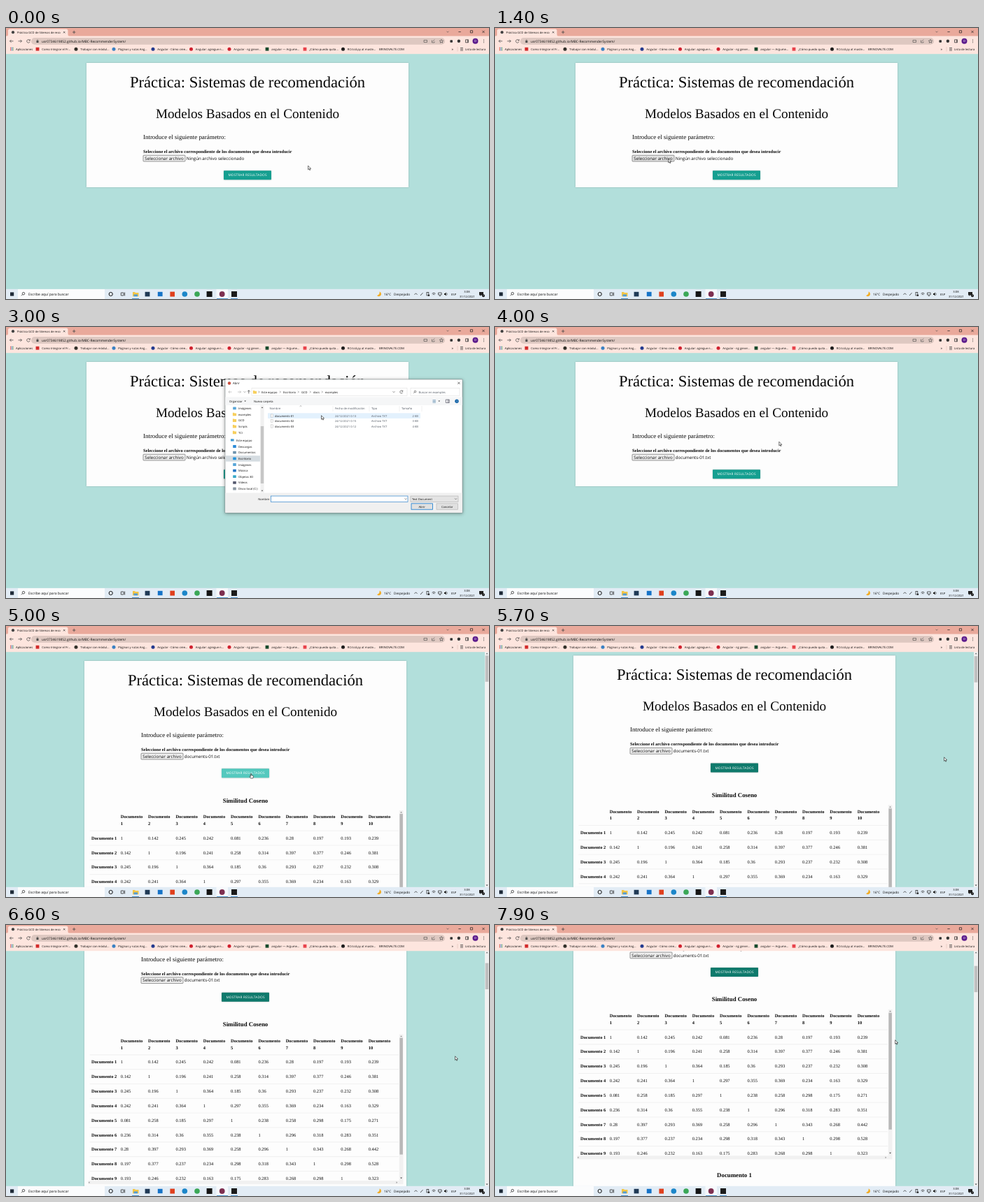
Write an HTML page that moves like this. It is 690 px wide and 388 px high and loops after 8 s.

```html
<!DOCTYPE html>
<html lang="es">
<head>
<meta charset="utf-8">
<title>Sistemas de recomendación</title>
<style>
html, body { margin: 0; width: 100%; height: 100%; overflow: hidden; background: #b2dfdb; }
svg { display: block; width: 100vw; height: 100vh; }
text { font-family: "Open Sans", "Noto Sans", sans-serif; fill: #0c0c0c; white-space: pre; text-rendering: geometricPrecision; }
text.serif { font-family: "Liberation Serif", "Noto Serif", serif; fill: #080808; }
.card { filter: drop-shadow(0 .7px .5px rgba(0,0,0,.16)) drop-shadow(0 .3px .8px rgba(0,0,0,.2)); }
.window { filter: drop-shadow(0 1.5px 2.5px rgba(0,0,0,.4)); }
</style>
</head>
<body>
<svg id="stage" viewBox="0 0 690 388" preserveAspectRatio="none"></svg>
<script>
const LOOP = 8000;

const rect = (x, y, w, h, fill, extra = '') =>
  `<rect x="${x}" y="${y}" width="${w}" height="${h}" fill="${fill}" ${extra}/>`;
const dot = (x, y, r, fill, extra = '') =>
  `<circle cx="${x}" cy="${y}" r="${r}" fill="${fill}" ${extra}/>`;
const line = (d, color = '#444', width = .75) =>
  `<path d="${d}" fill="none" stroke="${color}" stroke-width="${width}"/>`;
const shape = (d, fill) => `<path d="${d}" fill="${fill}"/>`;
const label = (x, y, size, text, extra = '') =>
  `<text x="${x}" y="${y}" font-size="${size}" ${extra}>${text}</text>`;
const serif = (x, y, size, text, extra = '') => label(x, y, size, text, `class="serif" ${extra}`);
const MID = 'text-anchor="middle"', END = 'text-anchor="end"', BOLD = 'font-weight="700"';
const border = (color, width = .6) => `stroke="${color}" stroke-width="${width}"`;

const down = (x, y, color = '#444') => line(`M${x - 1.5} ${y - .8}l1.5 1.5 1.5-1.5`, color, .6);
const next = (x, y) => line(`M${x - .6} ${y - 1.3}l1.3 1.3-1.3 1.3`, '#444', .5);
const lens = (x, y, r, color) =>
  dot(x, y, r, 'none', border(color, .7)) + line(`M${x - r * .7} ${y + r * .7}l${-r} ${r}`, color);
const folder = (x, y) => shape(`M${x - 2.6} ${y - 2.2}h2l.7.7h2.5v3.8h-5.2z`, '#f7cf5c');

// Upper triangle of the similarity matrix, in thousandths
const upper = [
  [142, 245, 242, 81, 236, 280, 197, 193, 239],
  [196, 241, 258, 314, 397, 377, 246, 381],
  [364, 185, 360, 293, 237, 232, 308],
  [297, 355, 369, 234, 163, 329],
  [238, 258, 298, 175, 271],
  [296, 318, 283, 351],
  [343, 268, 442],
  [298, 528],
  [323]
];
function similarity(i, j) {
  if (i === j) return 1;
  const a = Math.min(i, j), b = Math.max(i, j);
  return upper[a][b - a - 1] / 1000;
}

function table() {
  let out = serif(345, 252.5, 8.84, 'Similitud Coseno', `${MID} ${BOLD}`);
  const colX = j => 166.8 + 39.32 * j, rowY = i => 293.2 + 20.83 * i;
  for (let j = 0; j < 10; j++)
    out += serif(colX(j), 275.4, 6.45, 'Documento', BOLD) + serif(colX(j), 285.2, 6.45, j + 1, BOLD);
  for (let i = 0; i < 9; i++) {
    out += line(`M122.5 ${rowY(i)}H564`, '#e2e2e2', .5);
    out += serif(125, rowY(i) + 12.6, 6.45, 'Documento ' + (i + 1), BOLD);
    for (let j = 0; j < 10; j++) out += serif(colX(j), rowY(i) + 12.6, 6.45, similarity(i, j));
  }
  return out
    + rect(120, 473.6, 450.5, 5, '#f1f1f1') + rect(564.8, 264, 5.7, 209.6, '#f1f1f1')
    + rect(565.4, 269, 4.5, 167, '#b8b8b8')
    + shape('M566.2 267.4l1.4-1.6 1.4 1.6z', '#888') + shape('M566.2 469l1.4 1.6 1.4-1.6z', '#444')
    + shape('M122.4 474.7l-1.5 1.4 1.5 1.4z', '#888') + shape('M560.6 474.7l1.5 1.4-1.5 1.4z', '#888')
    + serif(345, 504, 8.84, 'Documento 1', `${MID} ${BOLD}`);
}

function page() {
  return rect(115, 50, 460, 178, '#fdfdfd', 'id="card" class="card"')
    + serif(345, 84.7, 22.64, 'Práctica: Sistemas de recomendación', MID)
    + serif(345, 129, 19.19, 'Modelos Basados en el Contenido', MID)
    + serif(196, 159, 8.92, 'Introduce el siguiente parámetro:')
    + serif(196, 179, 6.45, 'Seleccione el archivo correspondiente de los documentos que desea introducir', BOLD)
    + rect(196, 182.2, 60, 8.8, '#efefef', `id="pick" rx=".8" ${border('#5e5e5e', .65)}`)
    + label(198.3, 188.9, 6.18, 'Seleccionar archivo')
    + label(257.8, 188.9, 6.18, '', 'id="file"')
    + rect(311, 204.2, 68, 13, '#159f90', 'id="send" rx=".7" class="card"')
    + dot(353, 212, 0, '#fff', 'id="ripple" clip-path="url(#sendClip)"')
    + label(345.1, 212.4, 4.74, 'MOSTRAR RESULTADOS', `${MID} letter-spacing=".18" font-weight="500" style="fill:#fff"`)
    + `<g id="table">${table()}</g>`;
}

function browser() {
  let out = rect(0, 0, 690, 12, '#e9a99b')
    + shape('M1 12Q3 12 3 9V4Q3 1.5 5.5 1.5H86Q88.5 1.5 88.5 4V9Q88.5 12 91 12z', '#fde5de')
    + rect(0, 11.5, 690, 25.7, '#fde5de') + rect(36, 14, 591, 9.8, '#dec8c1', 'rx="4.9"')
    + dot(10, 6.2, 2.1, '#444')
    + label(16, 7.7, 4.1, 'Práctica GCD de Sitemas de reco')
    + line('M82 5l2.4 2.4m0-2.4l-2.4 2.4') + line('M95 6h4.4m-2.2-2.2v4.4') + down(631, 5.5)
    + line('M646.4 5.5h3.4M663.4 3.7h3.2v3.2h-3.2zM680.4 3.8l3.3 3.3m0-3.3l-3.3 3.3', '#222', .7)
    + line('M10.5 18.8h-5m2-2l-2 2 2 2M17.5 18.8h5m-2-2l2 2-2 2')
    + line('M34 17.7a2.3 2.3 0 1 0 .2 1.9M34.3 16.2v1.8h-1.8')
    + rect(43.5, 18.3, 3, 2.7, '#444') + line('M44.2 18.4v-1q.8-1.2 1.6 0v1', '#444', .6)
    + label(51, 20.7, 4.8, 'usr0734619852.github.io/MBC-RecommenderSystem/')
    + line('M597 17.4h4.5v3H597zM608.5 17.5v3.4h3.5v-1.5M609.7 19l2.6-2.4M622 16.3l.8 1.7 1.9.2-1.4 1.2.4 1.9-1.7-1-1.7 1 .4-1.9-1.4-1.2 1.9-.2z', '#444', .6)
    + rect(634.4, 17.2, 3.6, 3.6, '#333', 'rx=".8"') + dot(646.9, 18.8, 2.2, '#333')
    + line('M656.5 16.8h4v4h-4zM659.3 16.8v4', '#333')
    + dot(670.5, 18.8, 4, '#5b1a8b') + label(670.5, 20.4, 4.4, 'D', `${MID} style="fill:#fff"`)
    + [16.8, 18.8, 20.8].map(y => dot(682.6, y, .55, '#333')).join('');
  for (let i = 0; i < 9; i++)
    out += rect(6 + i % 3 * 1.7, 27.7 + Math.floor(i / 3) * 1.7, 1.2, 1.2, ['#d9534a', '#4a86d9', '#4aa564'][i % 3]);
  const marks = [
    [45, 's', '#d22b2b', 'Como Integrar el Fr…'], [100, 'c', '#33322b', 'Trabajar con módul…'],
    [154, 'c', '#3b82c4', 'Páginas y rutas Ang…'], [210, 'c', '#243b8f', 'Angular - Cómo cree…'],
    [264.5, 'c', '#d0212f', 'Angular: agregue n…'], [319, 'c', '#d0212f', 'Angular - ng gener…'],
    [373, 's', '#174a2c', 'angular — Argume…'], [427, 's', '#e8434b', '¿Cómo puedo quita…'],
    [481.5, 'c', '#1d1d1d', 'RC/ccd.py at maste…']
  ];
  out += label(14, 31.7, 4.2, 'Aplicaciones');
  for (const [x, kind, color, text] of marks)
    out += (kind === 's' ? rect(x - 2.4, 27.8, 4.8, 4.8, color) : dot(x, 30.2, 2.5, color))
      + label(x + 6.3, 31.7, 4.2, text);
  return out + label(533, 31.7, 4.3, 'BRINOVALTE.COM') + label(636.5, 31.9, 5, '»')
    + line('M645 27v6.5', '#d7b5ab', .5) + line('M649 28.5h4m-4 1.8h4m-4 1.8h4', '#333', .7)
    + label(656, 31.7, 4.15, 'Lista de lectura');
}

function pageBar() {
  return rect(684, 37, 6, 337, '#f1f1f1') + shape('M685.6 40.3l1.5-1.7 1.5 1.7z', '#666')
    + shape('M685.6 370.5l1.5 1.7 1.5-1.7z', '#444')
    + rect(684.7, 42.3, 4.6, 37.5, '#bfbfbf', 'id="thumb"');
}

function taskbar() {
  return rect(0, 373.8, 690, 14.2, '#e2ecf5') + rect(17, 374, 124, 14, '#fbfcfd')
    + rect(6, 378.4, 5.2, 5.2, '#1e2a38') + lens(25, 380.2, 1.8, '#222')
    + label(32, 382.7, 5.05, 'Escribe aquí para buscar')
    + dot(149.7, 381, 2.6, 'none', border('#111', 1))
    + line('M164.3 379h3.7v4h-3.7zM169.6 378.5v5', '#222')
    + rect(300.5, 374, 16.5, 14, '#f6f9fc')
    + shape('M181 378h3l1 1h4.5v5.3H181z', '#f4c545') + rect(182.5, 381.5, 5.5, 2.8, '#4f9bd6')
    + rect(198.6, 377.8, 6.8, 6.6, '#203a56') + rect(216.8, 377.8, 6.8, 6.4, '#1673c7')
    + rect(234.4, 377.6, 6.6, 7, '#df3f1d') + dot(255.3, 381, 3.8, '#1c86c9')
    + dot(273, 381, 3.8, '#3aa757') + rect(286.6, 377, 8, 8, '#151515')
    + dot(308.7, 381, 3.9, '#7d2f50') + rect(322, 377, 8, 8, '#1b1b1b')
    + [[180, 10], [301, 16], [321, 10]].map(([x, w]) => rect(x, 387.2, w, .8, '#2b7fc3')).join('')
    + shape('M533.6 377.6A3.4 3.4 0 1 1 530 383 4.4 4.4 0 0 0 533.6 377.6z', '#f2ac24')
    + label(540, 382.6, 4.65, '16°C') + label(554, 382.6, 4.65, 'Despejado')
    + line('M583.5 381.8l2-2 2 2M592 383l3.5-3.8', '#222')
    + rect(601, 378.4, 2.8, 4.6, 'none', border('#222', .7)) + dot(604, 382.7, 1.2, '#222')
    + line('M608.7 380.3q2.4-2.2 4.8 0M609.8 381.8q1.3-1.2 2.6 0', '#222')
    + line('M617.6 379h4.6v3h-4.6zM618.8 383.5h2.2', '#222', .7)
    + shape('M626 380h1.2l1.6-1.4v4.8l-1.6-1.4H626z', '#222') + line('M629.8 379.3q1.3 1.7 0 3.4', '#222', .5)
    + label(636, 382.5, 4.2, 'ESP')
    + label(658.5, 379, 4.2, '3:08', MID) + label(659, 385.9, 4.15, '31/12/2021', MID)
    + shape('M676 378h6v4.6h-3l-1.5 1.5v-1.5H676z', '#222')
    + dot(682, 383.3, 2, '#111') + label(682, 384.4, 3, '2', `${MID} style="fill:#fff"`);
}

function dialog() {
  const S = 4.1, grey = 'style="fill:#4c545e"';
  const places = [
    [116.3, 'Imágenes', '#58a6d8'], [125, 'examples'], [133.6, 'GCD'], [142.3, 'Scripts'], [151, 'TCI'],
    [171, 'Descargas', '#2b8bd8'], [179.6, 'Documentos', '#6d93ad'], [188.3, 'Escritorio', '#2494dd'],
    [197, 'Imágenes', '#58a6d8'], [205.6, 'Música', '#2776c5'], [214.2, 'Objetos 3D', '#38a9c9'],
    [222.8, 'Videos', '#565b70'], [231.5, 'Disco local (C:)', '#8b98a3']
  ];
  let out = rect(313, 75, 339, 191, '#fff', `class="window" ${border('#6f7b7e', .5)}`)
    + dot(319, 80.5, 2.2, '#c9503f') + label(324, 82, 4.3, 'Abrir')
    + line('M645.3 78.7l3.2 3.2m0-3.2l-3.2 3.2', '#222', .6)
    + line('M322.5 93h-4.6m1.8-1.8l-1.8 1.8 1.8 1.8M331 93h4.6m-1.8-1.8l1.8 1.8-1.8 1.8', '#aaa', .6)
    + down(341, 93, '#777') + line('M346.8 95.3v-4.6m-1.7 1.7l1.7-1.7 1.7 1.7', '#333', .7)
    + rect(351, 87.5, 222, 11, '#fff', border('#d9d9d9', .5)) + folder(355.5, 93.2) + next(361.3, 93);
  for (const [x, text] of [[365, 'Este equipo'], [396, 'Escritorio'], [422, 'GCD'], [439, 'docs'], [456, 'examples']])
    out += label(x, 94.5, S, text) + (x > 365 ? next(x - 4.3, 93) : '');
  out += down(554, 93) + line('M566.6 92a2 2 0 1 0 .1 1.7M566.8 90.6v1.6h-1.6', '#333', .6)
    + rect(578, 87.5, 70, 11, '#fff', border('#d9d9d9', .5)) + lens(584.5, 92.5, 1.3, '#555')
    + label(589.5, 94.5, S, 'Buscar en examples', grey)
    + rect(313.3, 100.3, 338.4, 11.7, '#f5f6f7')
    + label(319, 107.7, S, 'Organizar') + shape('M340.4 105.6h2.6l-1.3 1.5z', '#333') + label(354, 107.7, S, 'Nueva carpeta')
    + line('M609.5 104.7h4.4m-4.4 1.7h4.4m-4.4 1.7h4.4', '#5f8db0', .8) + shape('M617.5 105.6h2.6l-1.3 1.5z', '#333')
    + line('M628.3 104h5v4.4h-5zM631.6 104v4.4', '#334', .6)
    + dot(644, 106.3, 2.7, '#1464a8') + label(644, 107.9, 4, '?', `${MID} style="fill:#fff"`)
    + rect(314, 184.2, 49, 8.4, '#d5dce1');
  for (const [y, text, color] of places)
    out += (color ? rect(324.2, y - 1.9, 4.6, 3.8, color, 'rx=".5"') : folder(326.5, y)) + label(332, y + 1.5, S, text);
  out += rect(321, 160.3, 4.6, 3.2, '#3f9ad2') + label(329, 163.9, S, 'Este equipo')
    + rect(363.5, 112.3, 5, 125, '#f0f0f0') + rect(363.8, 142, 4.4, 82, '#c6c6c6')
    + shape('M364.7 116l1.3-1.5 1.3 1.5z', '#444') + shape('M364.7 233.8l1.3 1.5 1.3-1.5z', '#444')
    + line('M419.6 113.8l1.4-1.2 1.4 1.2', '#666', .5);
  for (const [x, text] of [[376.5, 'Nombre'], [470, 'Fecha de modificación'], [522, 'Tipo'], [565, 'Tamaño']])
    out += label(x, 118, S, text, grey);
  out += [467, 519, 562, 594].map(x => line(`M${x} 113v8`, '#e2e2e2', .5)).join('')
    + rect(374, 123.3, 218, 7.6, '#e3f1fd', 'id="hover"');
  [['0:13', 2], ['0:15', 3], ['0:12', 4]].forEach(([hour, size], i) => {
    const y = 128.6 + 7.5 * i;
    out += rect(378.6, y - 3.7, 3, 4.2, '#fafafa', border('#aaa', .4)) + label(384, y, S, 'documents-0' + (i + 1))
      + label(470, y, 4, '24/12/2021 ' + hour, grey) + label(522, y, S, 'Archivo TXT', grey)
      + label(589, y, S, size + ' KB', `${END} ${grey}`);
  });
  return out + rect(313.3, 237.5, 338.4, 28.2, '#f0f0f0')
    + label(377, 247.6, S, 'Nombre:', END) + rect(378.5, 242, 195.5, 8.3, '#fff', border('#2f83cc', .7))
    + down(571, 246.2) + rect(578, 242, 68, 8.3, '#e4e4e4', border('#adadad', .6)) + label(580, 247.6, S, 'Text Document')
    + down(642.5, 246.2) + rect(579, 252.8, 30.5, 8.4, '#e1e1e1', border('#0f78d0', .8))
    + label(594.2, 258.5, S, 'Abrir', MID)
    + rect(615, 252.8, 30.5, 8.4, '#e1e1e1', border('#adadad', .6)) + label(630.2, 258.5, S, 'Cancelar', MID);
}

const stage = document.getElementById('stage');
stage.innerHTML = `<defs>
  <clipPath id="view"><rect y="37" width="690" height="337"/></clipPath>
  <clipPath id="sendClip"><rect x="311" y="204.2" width="68" height="13"/></clipPath></defs>`
  + rect(0, 0, 690, 388, '#b2dfdb')
  + `<g clip-path="url(#view)"><g id="page">${page()}</g><g id="bar">${pageBar()}</g></g>`
  + browser() + taskbar() + `<g id="dialog">${dialog()}</g>`
  + `<g id="cursor" fill="#fff" stroke="#111" stroke-width=".6" stroke-linejoin="round">
    <path id="arrow" d="M0 0V5.6L1.3 4.4 2.2 6.4 3.1 6 2.2 4.1H4z"/>
    <path id="hand" d="M-.6.5Q0-.3.6.5V2.6L3 3.1Q3.6 3.4 3.4 4.3L2.8 6.8H-.4L-2 4.3Q-1.7 3.5-.6 4.3z"/></g>`;

const el = {};
stage.querySelectorAll('[id]').forEach(node => el[node.id] = node);
const show = (node, on) => node.setAttribute('visibility', on ? 'visible' : 'hidden');
const clamp = v => Math.max(0, Math.min(1, v));
const ease = v => v * v * (3 - 2 * v);

// Eased moves: [start, end, ...target values]
function follow(start, moves, t) {
  let now = start;
  for (const [a, b, ...to] of moves) {
    const k = ease(clamp((t - a) / (b - a)));
    now = now.map((v, i) => v + (to[i] - v) * k);
  }
  return now;
}
const pointer = [
  [850, 1350, 247.7, 187.2], [2200, 2800, 450.5, 126.7], [3700, 4350, 350, 211.2],
  [5150, 5600, 641.6, 187.8], [7400, 7800, 571.7, 164.7]
];
const NOTCH = 35.8;
const wheel = [5650, 5800, 6400, 7000].map((at, i) => [at, at + 170, NOTCH * (i + 1)]);

function draw(t) {
  const [x, y] = follow([431.6, 197.2], pointer, t);
  const [scroll] = follow([0], wheel, t);
  const opened = t >= 1900 && t < 3600, chosen = t >= 3600, done = t >= 4800;

  el.page.setAttribute('transform', `translate(${done ? -3 : 0} ${-scroll})`);
  el.card.setAttribute('height', done ? 1200 : 178);
  show(el.table, done);
  show(el.bar, done);
  el.thumb.setAttribute('y', 42.3 + scroll * .114);
  el.file.textContent = chosen ? 'documents-01.txt' : 'Ningún archivo seleccionado';

  const px = x + (done ? 3 : 0), py = y + scroll;
  const overSend = !opened && px > 311 && px < 379 && py > 204 && py < 217;
  const overPick = !opened && px > 196 && px < 256 && py > 182 && py < 191;
  el.send.setAttribute('fill', overSend ? '#2bbbad' : t >= 4700 ? '#0f7a6c' : '#159f90');
  el.pick.setAttribute('fill', overPick ? '#e3e3e3' : '#efefef');
  el.ripple.setAttribute('r', 60 * clamp((t - 4700) / 250));
  el.ripple.setAttribute('opacity', .2 * (1 - clamp((t - 5000) / 250)));

  show(el.dialog, opened);
  el.dialog.setAttribute('opacity', clamp((t - 1850) / 150));
  show(el.hover, opened && y > 123 && y < 131 && x > 374);
  el.cursor.setAttribute('transform', `translate(${x} ${y})`);
  show(el.arrow, !overSend);
  show(el.hand, overSend);
}

const began = performance.now();
function tick() {
  draw((performance.now() - began) % LOOP);
  requestAnimationFrame(tick);
}
tick();
</script>
</body>
</html>
```
